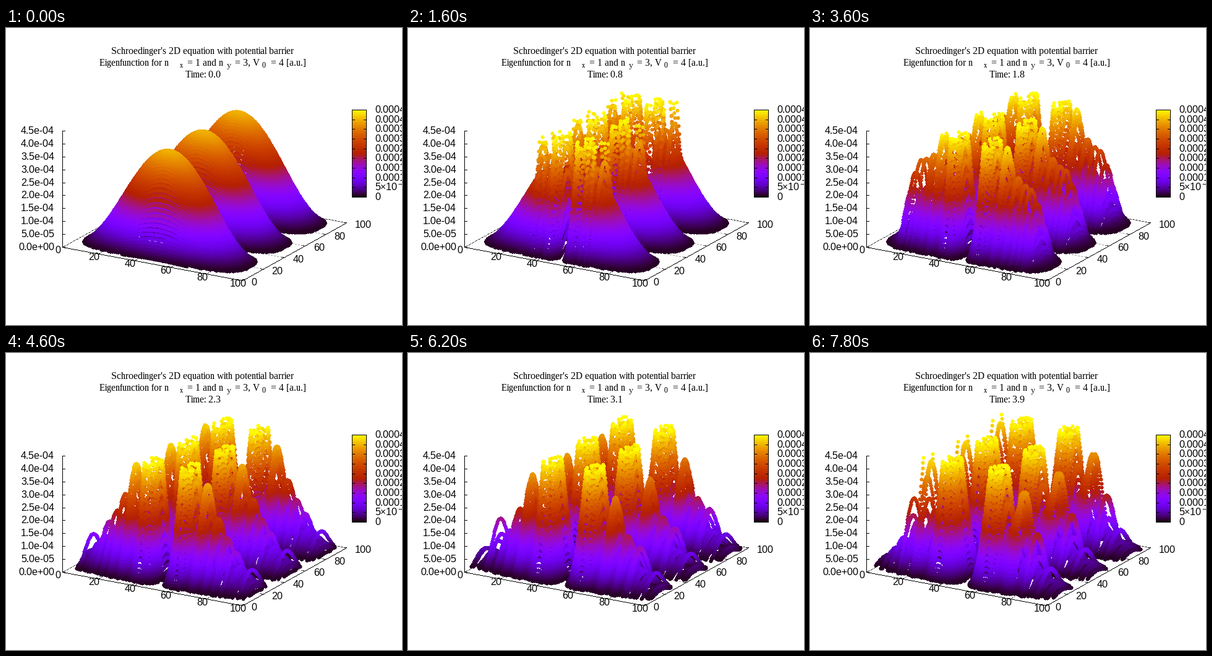
Write a matplotlib script that moves like this. It is 640x480 px and loops after 8 s.

```python
import numpy as np
import matplotlib.pyplot as plt
from matplotlib.animation import FuncAnimation

W, H, DPI = 640, 480, 100
FRAMES, INTERVAL = 40, 200
Z_MAX, Z_MIN, PEAK = 4.5e-4, 1e-5, 4e-4
STEP = 0.5                   # grid spacing in x and y
V0, BARRIER = 4.0, (50.5, 51.5)
TIME_UNIT = 10               # atomic units per unit on the clock

plt.rcParams["text.hinting"] = "default"
plt.rcParams["text.hinting_factor"] = 1


def project(x, y, z=0.0):
    """Plot coordinates to stage pixels."""
    return (91 + 2.91 * x + 1.68 * y,
            354 + 0.54 * x - 0.935 * y - 188 * z / Z_MAX)


def palette(v):
    v = np.clip(v, 0, 1)
    rgba = np.stack([np.sqrt(v), v ** 3,
                     np.clip(np.sin(2 * np.pi * v), 0, 1),
                     np.ones_like(v)], axis=-1)
    return np.rint(rgba * 255).astype(np.uint8)


# wave function: sine in y, lattice eigenstates with a barrier in x
xs = np.arange(STEP, 100, STEP)
ys = np.arange(100, -0.1, -STEP)
y_profile = np.sin(3 * np.pi * ys / 100) ** 2
hop = 0.5 / STEP ** 2
inside = (xs >= BARRIER[0]) & (xs <= BARRIER[1])
neighbours = np.eye(len(xs), k=1) + np.eye(len(xs), k=-1)
energy, states = np.linalg.eigh(np.diag(2 * hop + V0 * inside)
                                - hop * neighbours)
weights = states.T @ np.sin(np.pi * xs / 100)
base_x, base_y = project(*np.meshgrid(xs, ys, indexing="ij"))

oy, ox = np.mgrid[-3:4, -3:4]
disk = ox ** 2 + oy ** 2 <= 9
ox, oy = ox[disk], oy[disk]

canvas = np.full((H, W, 4), 255, np.uint8)


def surface(t):
    """Stage picture with all points, far ones first."""
    psi = states @ (weights * np.exp(-1j * energy * TIME_UNIT * t))
    rho = PEAK * np.outer(np.abs(psi) ** 2, y_profile)
    keep = (rho > Z_MIN) & (rho <= Z_MAX)
    z = rho[keep]
    px = np.rint(base_x[keep]).astype(int)
    py = np.rint(base_y[keep] - 188 * z / Z_MAX).astype(int)
    cells = (py[:, None] + oy) * W + px[:, None] + ox
    out = canvas.copy()
    colors = palette(z / Z_MAX).view(np.uint32).ravel()
    out.view(np.uint32).reshape(-1)[cells.ravel()] = np.repeat(colors, len(ox))
    return out


fig = plt.figure(figsize=(W / DPI, H / DPI), dpi=DPI, facecolor="white")
ax = fig.add_axes([0, 0, 1, 1])
ax.axis("off")


def line(p, q, shade=0, dashed=False):
    """One-pixel line on the canvas."""
    n = int(max(abs(q[0] - p[0]), abs(q[1] - p[1]))) + 1
    x = np.rint(np.linspace(p[0], q[0], n)).astype(int)
    y = np.rint(np.linspace(p[1], q[1], n)).astype(int)
    on = np.arange(n) % 5 < 3 if dashed else slice(None)
    canvas[y[on], x[on], :3] = shade


def text(x, y, s, size, font, ha):
    return ax.text(x, y, s, fontsize=size * 72 / DPI, family=font,
                   color="black", ha=ha, va="baseline")


def serif(x, y, s, size=16, ha="left"):
    return text(x, y, s, size, "Liberation Serif", ha)


def label(x, y, s, ha, size=16):
    """Sans text with its digits centred on y."""
    return text(x, round(y + 5.5), s, size, "Liberation Sans", ha)


# heading
serif(318, 42, "Schroedinger's 2D equation with potential barrier",
      ha="center")
for x, s in [(151, "Eigenfunction for n"), (293, "= 1 and n"),
             (370, "= 3, V"), (428, "= 4 [a.u.]")]:
    serif(x, 61, s)
for x, s in [(280, "x"), (357, "y"), (414, "0")]:
    serif(x, 64, s, 12.8)
clock = serif(318, 80, "", ha="center")

# base plane, grid and ticks
left, front, right, back = [project(*c) for c in
                            [(0, 0), (100, 0), (100, 100), (0, 100)]]
line(left, back)
line(back, right)
for v in range(0, 101, 20):
    line(project(0, v), project(100, v), 160, dashed=True)
    line(project(v, 0), project(v, 100), 160, dashed=True)
line(left, front)
line(front, right)
for v in range(0, 101, 20):
    x, y = project(v, 0)
    label(x - 7, y + 5, str(v), "center")
    line((x, y), project(v, 2))
    x, y = project(100, v)
    label(x + 14, y + 3, str(v), "left")
    line((x, y), project(98.5, v))

# vertical axis
line((91, 354), (91, 166))
for i in range(10):
    y = 354 - 188 * i / 9
    line((91, y), (95, y))
    label(78, y - 0.5, f"{i * 5e-5:.1e}", "right")

# colour scale
canvas[132:274, 559:583] = palette(np.linspace(1, 0, 142))[:, None]
box = [(559, 132), (582, 132), (582, 273), (559, 273)]
for p, q in zip(box, box[1:] + box[:1]):
    line(p, q)
for i in range(10):
    y = 273 - 141 * i / 9
    line((559, y), (563, y))
    line((578, y), (582, y))
    if i == 1:
        label(596, y - 0.5, "5×10", "left")
        label(633, y - 6, "−5", "left", 12.8)
    else:
        label(596, y - 0.5, f"{i * 5e-5:.5f}".rstrip("0").rstrip(".") or "0",
              "left")

picture = ax.imshow(canvas, extent=(0, W, H, 0), aspect="auto",
                    interpolation="nearest")
ax.set_xlim(0, W)
ax.set_ylim(H, 0)


def update(i):
    t = i * 0.1
    picture.set_data(surface(t))
    clock.set_text(f"Time: {t:.1f}")
    return picture, clock


anim = FuncAnimation(fig, update, frames=FRAMES, interval=INTERVAL,
                     repeat=True, repeat_delay=0, blit=False)
plt.show()
```
